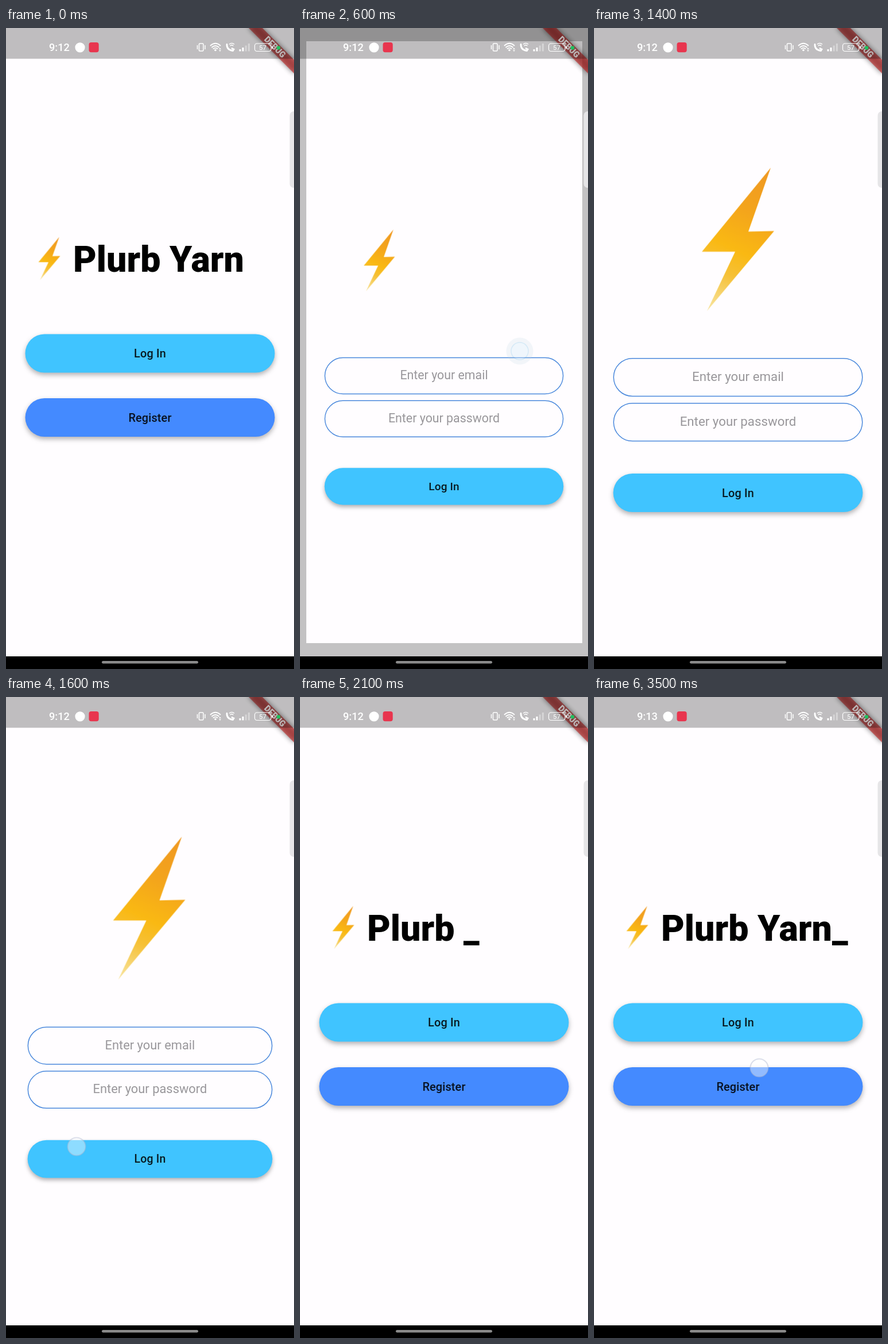
These frames come from a looping animation (502 by 1115 pixels, 3600 ms). An HTML page:

```html
<!DOCTYPE html>
<html lang="en">
<head>
<meta charset="utf-8">
<title>Chat app</title>
<style>
  html, body { margin: 0; width: 100%; height: 100%; overflow: hidden; background: #000; }
  svg { display: block; width: 502px; height: 1115px; font-family: Roboto, sans-serif; }
  .mid { text-anchor: middle; }
  .label { font-size: 19.9px; font-weight: 500; letter-spacing: .14px; fill: #000; fill-opacity: .87; }
  .hint { font-size: 22.3px; fill: #99979b; }
  .field { fill: none; stroke: #4a88dc; stroke-width: 1.5; }
  .button { filter: drop-shadow(0 4px 4px rgba(0, 0, 0, .3)); }
  .page { transform-origin: 251px 546.5px; }
  .page, .timed { animation: 3600ms linear infinite; }

  #home { animation-name: home; }
  #login { animation-name: login, login-fade; }
  #scrim { animation-name: scrim; }
  #pressed { animation-name: pressed; }
  #tap { animation-name: tap; }
  #splash { animation-name: splash; }
  #swipe { animation-name: swipe; }
  #press { animation-name: press; }

  @keyframes home {
    0%, 14.278% { transform: none; animation-timing-function: cubic-bezier(.05, 0, .1333, .06); }
    15.667% { transform: scale(1.02); animation-timing-function: cubic-bezier(.2083, .82, .25, 1); }
    22.611% { transform: scale(1.05); animation-timing-function: step-end; }
    43.972% { transform: scale(1.1); animation-timing-function: cubic-bezier(.05, 0, .1333, .06); }
    45.361% { transform: scale(1.06); animation-timing-function: cubic-bezier(.2083, .82, .25, 1); }
    52.306%, 100% { transform: none; }
  }
  @keyframes login {
    0%, 14.278% { transform: scale(.85); animation-timing-function: cubic-bezier(.05, 0, .1333, .06); }
    15.667% { transform: scale(.91); animation-timing-function: cubic-bezier(.2083, .82, .25, 1); }
    22.611%, 43.972% { transform: none; animation-timing-function: cubic-bezier(.05, 0, .1333, .06); }
    45.361% { transform: scale(.94); animation-timing-function: cubic-bezier(.2083, .82, .25, 1); }
    52.306%, 100% { transform: scale(.9); }
  }
  @keyframes login-fade {
    0%, 15.32% { opacity: 0; }
    16.36%, 44.66% { opacity: 1; }
    45.7%, 100% { opacity: 0; }
  }
  @keyframes scrim {
    0%, 16% { opacity: 0; }
    17.76%, 22.6% { opacity: .6; }
    22.61%, 100% { opacity: 0; }
  }
  @keyframes pressed {
    0%, 8.3% { opacity: 0; }
    12%, 22% { opacity: .1; }
    23%, 100% { opacity: 0; }
  }
  @keyframes tap {
    0%, 8.2% { opacity: 0; }
    10%, 14.5% { opacity: 1; }
    18%, 100% { opacity: 0; }
  }
  @keyframes splash {
    0%, 8.3% { transform: scale(.5); }
    13.9%, 100% { transform: scale(1); }
  }
  @keyframes swipe {
    0%, 39.5% { transform: translate(15px, 782px); opacity: 0; }
    41% { transform: translate(40px, 782px); opacity: 1; }
    44.4% { transform: translate(123px, 782px); opacity: 1; }
    47.2% { transform: translate(123px, 782px); opacity: .35; }
    49%, 100% { transform: translate(123px, 782px); opacity: 0; }
  }
  @keyframes press {
    0%, 94% { opacity: 0; }
    96%, 100% { opacity: 1; }
  }
</style>
</head>
<body>
<svg viewBox="0 0 502 1115">
  <defs>
    <linearGradient id="gold" gradientUnits="userSpaceOnUse" x1="57" y1="-110" x2="-54" y2="124">
      <stop offset="0" stop-color="#f09a22"/>
      <stop offset=".28" stop-color="#f4a51c"/>
      <stop offset=".55" stop-color="#fab913"/>
      <stop offset=".72" stop-color="#f6c137"/>
      <stop offset="1" stop-color="#f8e6a4"/>
    </linearGradient>
    <filter id="blur" x="-20%" y="-100%" width="140%" height="300%"><feGaussianBlur stdDeviation="5"/></filter>
    <circle id="dot" r="15.5" fill="#fff" fill-opacity=".42" stroke="#b0b8d0" stroke-opacity=".45" stroke-width="2"/>
  </defs>

  <g id="home" class="page">
    <rect width="502" height="1093" fill="#fffdff"/>
    <text id="title" x="117" y="423.5" font-size="62.7" font-weight="900"></text>
    <rect class="button" x="33.5" y="532.5" width="435" height="67" rx="33.5" fill="#40c4ff"/>
    <rect id="pressed" class="timed" x="33.5" y="532.5" width="435" height="67" rx="33.5" fill="#bbb"/>
    <text class="mid label" x="251" y="573">Log In</text>
    <rect class="button" x="33.5" y="644" width="435" height="67" rx="33.5" fill="#448aff"/>
    <text class="mid label" x="251" y="684.5">Register</text>
  </g>
  <rect id="scrim" class="timed" width="502" height="1093"/>

  <g id="login" class="page">
    <rect width="502" height="1093" fill="#fffdff"/>
    <rect class="field" x="34.2" y="574.7" width="433.6" height="65.8" rx="32.9"/>
    <text class="mid hint" x="251" y="614">Enter your email</text>
    <rect class="field" x="34.2" y="652.8" width="433.6" height="65.8" rx="32.9"/>
    <text class="mid hint" x="251" y="692">Enter your password</text>
    <rect class="button" x="33.5" y="775" width="435" height="67" rx="33.5" fill="#40c4ff"/>
    <text class="mid label" x="251" y="815.5">Log In</text>
  </g>

  <path id="bolt" fill="url(#gold)" d="M57-124.5 18-13.5 63-14.5-54 124.5-5 21.5-63 21.5Z"/>

  <!-- debug ribbon -->
  <g transform="translate(502 0) rotate(45)">
    <rect x="-56" y="39" width="112" height="16.8" opacity=".5" filter="url(#blur)"/>
    <rect x="-56" y="39" width="112" height="16.8" fill="#b71c1c" fill-opacity=".627"/>
    <text class="mid" y="52" font-size="14.2" font-weight="900" fill="#fff">DEBUG</text>
  </g>

  <!-- system bars -->
  <rect width="502" height="53.5" opacity=".25"/>
  <rect x="494.5" y="145" width="20" height="133" rx="7" fill="#e6e5e7"/>
  <rect y="1093" width="502" height="22"/>
  <rect x="167" y="1101" width="168" height="4.4" rx="2.2" fill="#8b8b8b"/>
  <g fill="#fff">
    <text id="clock" x="75" y="40" font-size="18.2" font-weight="500">9:12</text>
    <circle cx="129" cy="33.8" r="8.6"/>
    <rect x="144.5" y="25" width="17.2" height="17.2" rx="4" fill="#e8354e"/>
    <path d="M406.5 37h3v3.5h-3zM411.5 34h3v6.5h-3z"/>
    <path opacity=".35" d="M416.7 30.5h3v10h-3zM421.9 27h3v13.5h-3z"/>
    <text class="mid" x="447.5" y="38.2" font-size="11.5">57</text>
    <path d="M463.5 31.5q2 .5 2 2.5t-2 2.5z"/>
    <circle cx="365" cy="38.5" r="1.8"/>
    <path d="M371 37h4l-2-2.5zM371 38.5h4l-2 2.5z"/>
  </g>
  <g fill="none" stroke="#fff" stroke-width="1.5" stroke-linecap="round">
    <rect x="336.5" y="27" width="7.5" height="13" rx="1.5"/>
    <path d="M333.5 30.5v6M347 30.5v6"/>
    <path stroke-width="1.8" d="M356.5 30.5q8.500-7.500 17 0M359 33.500q6-5 12 0M361.500 36q3.500-2.700 7 0"/>
    <path stroke-width="2.8" d="M385 28.500q-.5 9.500 10.500 11l1.500-2.500-3-1.500"/>
    <path d="M389.500 28q4-3 8 0M391.200 30.700q2.300-1.700 4.600 0"/>
    <rect x="433.5" y="27" width="28.5" height="13.5" rx="4" stroke-width="1.2"/>
  </g>
  <circle cx="475" cy="34.5" r="3.3" fill="#20c060"/>

  <!-- touches -->
  <g transform="translate(383 562)">
    <g id="tap" class="timed">
      <circle id="splash" class="timed" r="23.5" fill="#bcd6e3" fill-opacity=".5"/>
      <circle r="15" fill="#d4e9f6" stroke="#8fc8e8" stroke-width="1.5"/>
    </g>
  </g>
  <use id="swipe" class="timed" href="#dot"/>
  <g transform="translate(288 645)"><use id="press" class="timed" href="#dot"/></g>
</svg>
<script>
  const LOOP = 3600, FLIGHT = 300, PUSH = 514, POP = 1583;
  const NAME = 'Plurb Yarn';
  const LEFT = 33.5, ARC_RADIUS = 536, ARC_SWEEP = .714, FULL_SIZE = 279;
  const HOME = { right: 117.5, top: 359, bottom: 443 };
  const LOGIN = { right: 468.5, top: 228, bottom: 507 };
  const [title, bolt, clock] = ['title', 'bolt', 'clock'].map(id => document.getElementById(id));

  // cubic-bezier(.4, 0, .2, 1)
  function ease(x) {
    if (x <= 0 || x >= 1) return x <= 0 ? 0 : 1;
    let lo = 0, hi = 1, u;
    for (let i = 0; i < 24; i++) {
      u = (lo + hi) / 2;
      const at = 1.2 * u * (1 - u) ** 2 + .6 * u * u * (1 - u) + u ** 3;
      if (at < x) lo = u; else hi = u;
    }
    return u * u * (3 - 2 * u);
  }

  // The upper right corner follows an arc, the lower edge a straight line.
  function flyBolt(from, to, e) {
    const way = Math.sign(to.right - from.right), angle = ARC_SWEEP * e;
    const right = from.right + way * ARC_RADIUS * Math.sin(angle);
    const top = from.top - way * ARC_RADIUS * (1 - Math.cos(angle));
    const bottom = from.bottom + (to.bottom - from.bottom) * e;
    const scale = Math.min(right - LEFT, bottom - top) / FULL_SIZE;
    bolt.setAttribute('transform',
      `translate(${(LEFT + right) / 2} ${(top + bottom) / 2}) scale(${scale})`);
  }

  // Typing pauses while the login page covers the title.
  function typed(t) {
    if (t < 366) return NAME;
    const origin = t < POP ? 366 : 1141.4;
    const step = Math.floor((Math.min(t, t < POP ? PUSH + FLIGHT : LOOP) - origin) / (2500 / 18));
    if (step <= 0) return '';
    const cursor = step <= NAME.length || (step - NAME.length) % 2 === 0;
    return NAME.slice(0, step) + (cursor ? '_' : '');
  }

  let start;
  function draw(now) {
    start ??= now;
    const t = (now - start) % LOOP;
    if (t < POP) flyBolt(HOME, LOGIN, ease((t - PUSH) / FLIGHT));
    else flyBolt(LOGIN, HOME, ease((t - POP) / FLIGHT));
    title.textContent = typed(t);
    clock.textContent = t < 2800 ? '9:12' : '9:13';
    requestAnimationFrame(draw);
  }
  requestAnimationFrame(draw);
</script>
</body>
</html>
```
